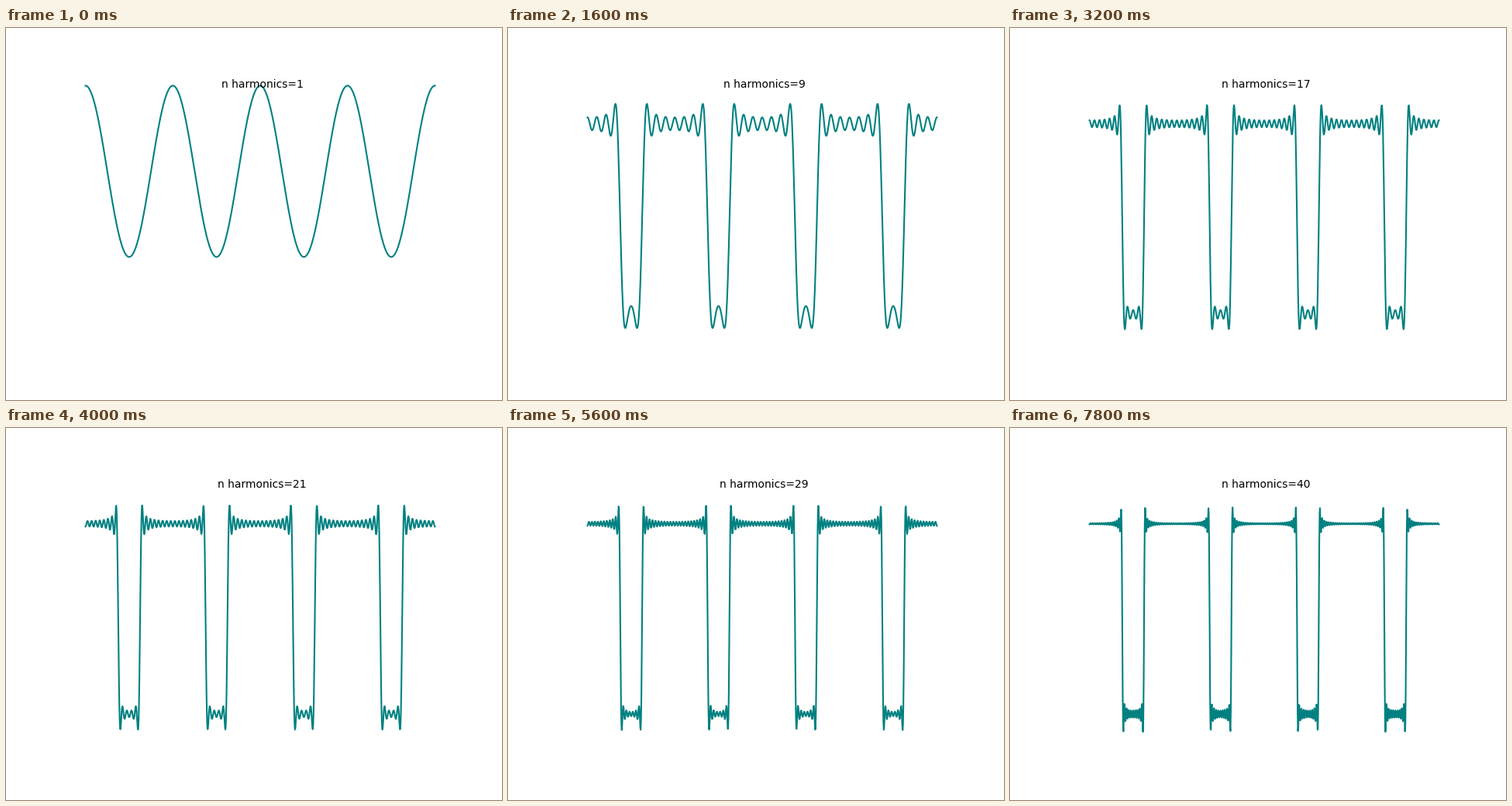
A matplotlib script for the animation above (8 s loop, 640 by 480 pixels).

```python
import numpy as np
import matplotlib.pyplot as plt
from matplotlib.animation import ArtistAnimation

HARMONICS = 40
DUTY = 0.75
PERIODS = 4

plt.rcParams["font.family"] = "DejaVu Sans"


def pulse_series(t, n):
    """Partial Fourier sum of a unit pulse train centred on t = 0."""
    k = np.arange(1, n + 1)[:, None]
    coeffs = 2 / (np.pi * k) * np.sin(np.pi * k * DUTY)
    return DUTY + np.sum(coeffs * np.cos(2 * np.pi * k * t), axis=0)


fig, ax = plt.subplots(figsize=(6.4, 4.8), dpi=100)
ax.axis("off")

t = np.linspace(0, PERIODS, 1000)
frames = []
for n in range(1, HARMONICS + 1):
    line, = ax.plot(t, pulse_series(t, n), color="teal", lw=1.5)
    label = ax.text(0.505, 0.9475, f"n harmonics={n}", fontsize=10,
                    ha="center", va="baseline", transform=ax.transAxes)
    frames.append([line, label])

anim = ArtistAnimation(fig, frames, interval=200, repeat=True,
                       repeat_delay=0, blit=False)

plt.show()
```
